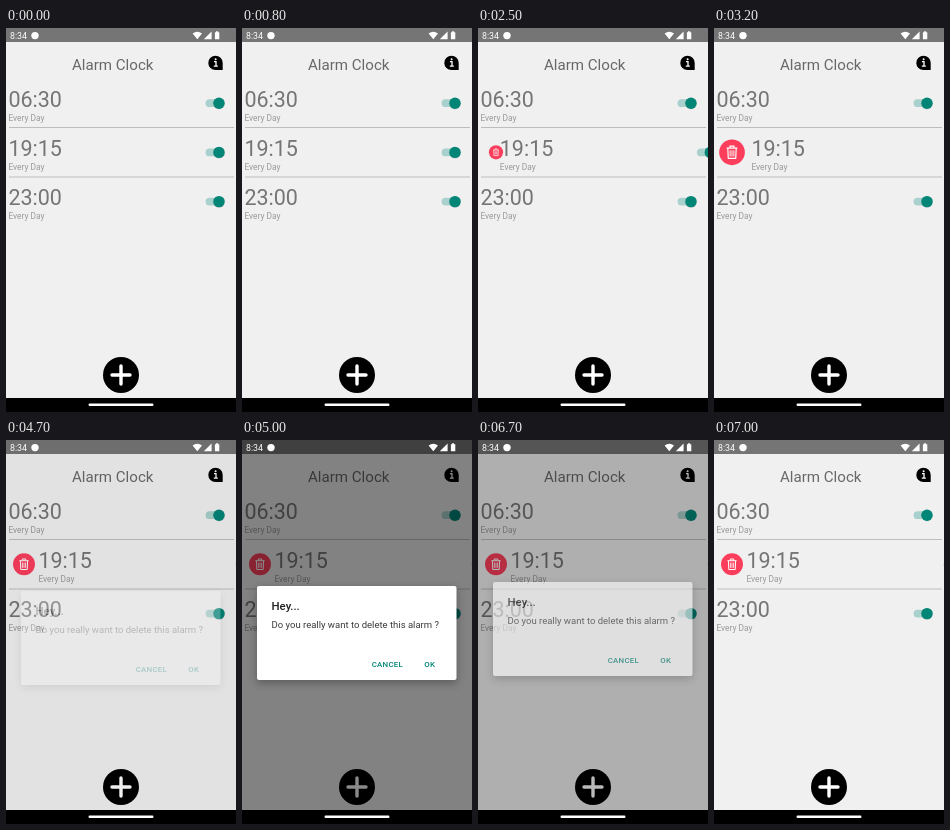
An HTML page for the animation above (8000 ms loop, 230 px wide and 384 px high).

```html
<!DOCTYPE html>
<html lang="en">
<head>
<meta charset="utf-8">
<title>Alarm Clock</title>
<style>
  html, body { margin: 0; width: 100%; height: 100%; overflow: hidden; background: #f0f0f0; }
  svg { display: block; width: 230px; height: 384px; font-family: Roboto, Arial, sans-serif; }
  .time { font-size: 21.5px; fill: #757575; }
  .days { font-size: 8.4px; fill: #9a9a9a; }
  .title { font-size: 15.1px; fill: #686868; }
  .button { font-size: 7.9px; font-weight: 500; letter-spacing: .25px; fill: #008577; }
  #dialog { filter: drop-shadow(0 3px 4px rgba(0, 0, 0, .3)); }
</style>
</head>
<body>
<svg viewBox="0 0 230 384">
  <defs>
    <g id="switch">
      <rect x="199.6" y="71.3" width="18.5" height="7.8" rx="3.9" fill="#a8d0cc"/>
      <circle cx="213" cy="75.7" r="5.8" fill="#000" opacity=".12"/>
      <circle cx="213" cy="75.2" r="5.7" fill="#008577"/>
    </g>
  </defs>

  <rect width="230" height="384" fill="#f0f0f0"/>
  <rect width="230" height="14" fill="#757575"/>
  <text class="title" x="106.7" y="42.4" text-anchor="middle">Alarm Clock</text>
  <path d="M209.5 27.7a7.2 7.2 0 0 1 7.2 7.2V42.1H209.5a7.2 7.2 0 0 1 0-14.4z"/>
  <path d="M208 33.6h2v4.3M207.8 38.2h4" fill="none" stroke="#fff" stroke-width="1.3"/>
  <circle cx="209.6" cy="31.2" r="1" fill="#fff"/>

  <g id="trash">
    <circle r="11" fill="#fa3e5b"/>
    <g fill="none" stroke="#fff" stroke-width="1">
      <path d="M-4.6-3.6H4.6M-1.7-3.8V-5.3H1.7V-3.8M-3.6-3.4L-3.2 5.2H3.2L3.6-3.4"/>
      <path d="M-1.6-1.7V3.6M0-1.7V3.6M1.6-1.7V3.6" stroke-width=".8"/>
    </g>
  </g>
  <g id="rows"></g>
  <path d="M3 99.5H228M3 149H228" stroke="#bdbdbd"/>

  <circle cx="115" cy="347" r="18"/>
  <path d="M106 347H124M115 338V356" stroke="#fff" stroke-width="3.4" stroke-linecap="round"/>

  <rect id="dim" width="230" height="370"/>
  <g id="dialog">
    <rect x="15" y="145" width="199.5" height="94" rx="2" fill="#fff"/>
    <text x="29.5" y="168.6" font-size="11.4" font-weight="500" fill="#212121">Hey...</text>
    <text x="29.5" y="187" font-size="9.53" fill="#3a3a3a">Do you really want to delete this alarm ?</text>
    <text class="button" x="129.7" y="225.8">CANCEL</text>
    <text class="button" x="182.3" y="225.8">OK</text>
  </g>

  <g fill="#fff">
    <text x="4" y="10.8" font-size="8.8">8:34</text>
    <circle cx="29" cy="7.6" r="3.7"/>
    <path d="M186.6 5.6Q191.3 1.8 196 5.6L191.3 11.2zM205.6 3.4V11.2H197.8z"/>
    <path d="M208.9 4.2H210.1V3.3H212.1V4.2H213.3V11.3H208.9z"/>
  </g>
  <rect y="370" width="230" height="14"/>
  <rect x="82.5" y="375.5" width="65" height="2.4" rx="1.2" fill="#fff"/>
</svg>
<script>
const LOOP = 8000, STEP = 100;
const byId = id => document.getElementById(id);

byId('rows').innerHTML = ['06:30', '19:15', '23:00'].map((time, i) =>
  `<g id="row${i}"><g transform="translate(0 ${i * 49.2})">
    <text class="time" x="2.4" y="78.5">${time}</text>
    <text class="days" x="2.4" y="92.8">Every Day</text>
    <use href="#switch"/></g></g>`).join('');

// Each track is a list of [ms, value], joined linearly.
const tracks = {
  swipe: [[1700, 0], [1800, 1], [2600, 22], [3200, 35], [3450, 36], [3600, 33], [3800, 31], [4000, 30]],
  dim: [[4600, 0], [4700, .06], [5000, .46], [5200, .56], [5400, .6], [6600, .6], [6700, .27], [6800, .1], [7000, 0]],
  alpha: [[4600, 0], [4700, .25], [4900, 1], [6600, 1], [6700, .6], [6900, 0]],
  lift: [[4700, 6], [5000, 1], [5200, 0], [6600, 0], [6700, -3], [6900, -8]]
};

function valueAt(track, t) {
  const i = track.findIndex(key => key[0] > t);
  if (i === 0) return track[0][1];
  if (i < 0) return track[track.length - 1][1];
  const [t0, v0] = track[i - 1], [t1, v1] = track[i];
  return v0 + (v1 - v0) * (t - t0) / (t1 - t0);
}

function draw(now) {
  const t = Math.floor(now % LOOP / STEP) * STEP;
  const swipe = valueAt(tracks.swipe, t);
  const alpha = valueAt(tracks.alpha, t);
  byId('row1').setAttribute('transform', `translate(${swipe} 0)`);
  byId('trash').setAttribute('transform', `translate(18 124.3) scale(${swipe / 30})`);
  byId('dim').setAttribute('opacity', valueAt(tracks.dim, t));
  byId('dialog').setAttribute('opacity', alpha);
  byId('dialog').setAttribute('transform', `translate(0 ${valueAt(tracks.lift, t)})`);
}

const start = performance.now();
function frame() {
  draw(performance.now() - start);
  requestAnimationFrame(frame);
}
frame();
</script>
</body>
</html>
```
